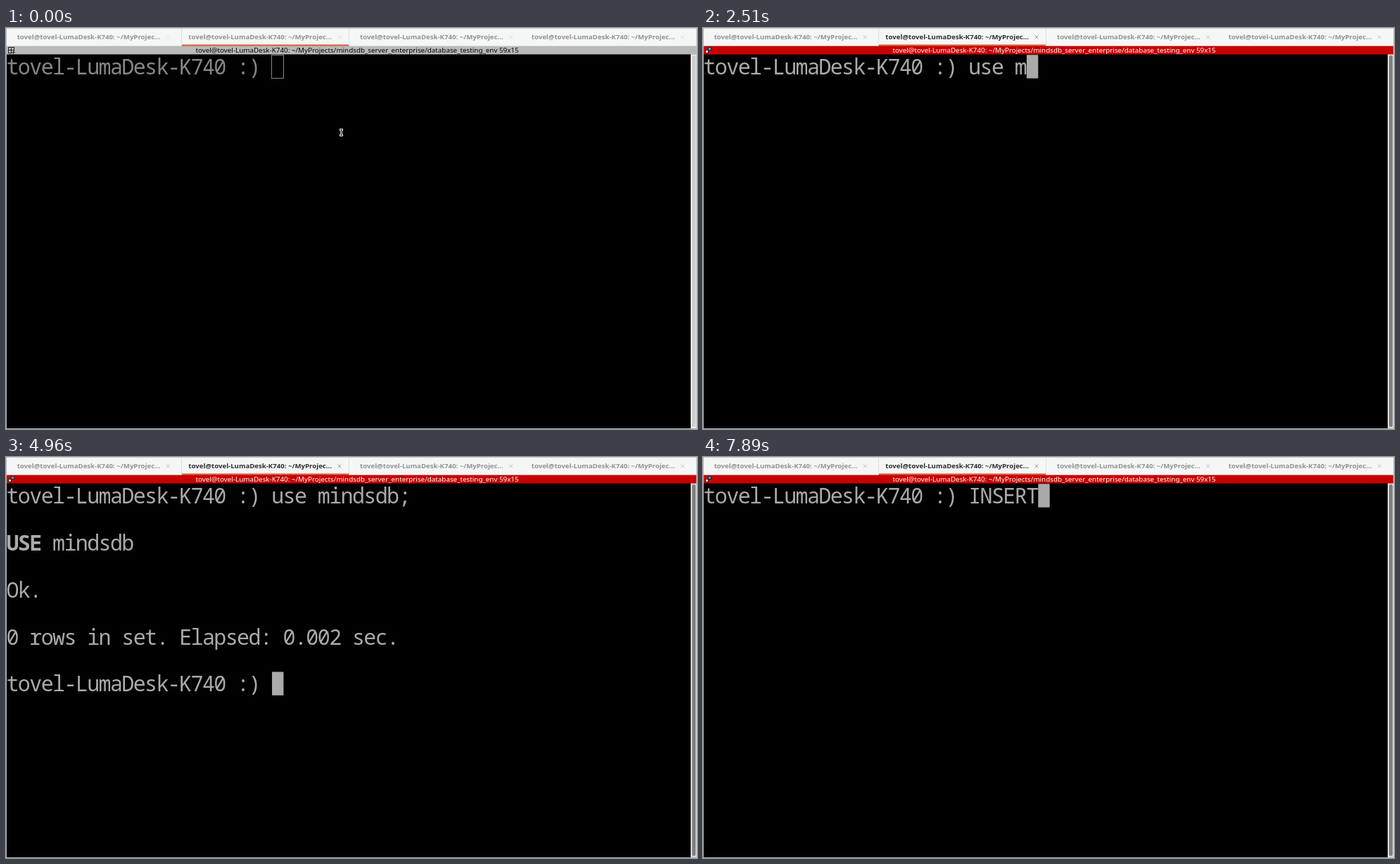
An HTML page with a canvas that plays this animation: 982x570 px, repeating every 8000 ms.

```html
<!DOCTYPE html>
<html lang="en">
<head>
<meta charset="utf-8">
<title>Terminal session</title>
<style>
  html, body { margin: 0; width: 100%; height: 100%; overflow: hidden; background: #000; }
  canvas { display: block; width: 982px; height: 570px; }
</style>
</head>
<body>
<canvas id="stage" width="982" height="570"></canvas>
<script>
const ctx = document.getElementById('stage').getContext('2d');
const LOOP = 8000;
const HOST = 'tovel-LumaDesk-K740';
const USER = 'tovel@' + HOST + ': ~/MyProjec';
const PROMPT = HOST + ' :) ';
const TITLE = USER + 'ts/mindsdb_server_enterprise/database_testing_env 59x15';
const UI = '"Noto Sans", "Open Sans", sans-serif';
const MONO = '"Noto Sans Mono", "DejaVu Sans Mono", monospace';
const CELL_W = 16.38, CELL_H = 33.4, LEFT = 1.3, TOP = 38.2;
const BAR_TOP = 25.6, BAR_BOTTOM = 37.6;

const FIRST = { text: 'use mindsdb;', times: [2010, 2090, 2290, 2400, 2510, 2680, 2910, 3010, 3170, 3300, 3590, 3850] };
const SECOND = { text: 'INSERT', times: [6940, 7120, 7210, 7310, 7520, 7890] };
const ENTER = 4260, CLEAR = 5330;
const CURSOR_OFF = [[1300, 1800], [4740, 4960], [5940, 6550]];
// Pointer stops as [start, x, y]; typing hides it.
const POINTER = [[0, 476, 148], [410, 476, 147], [570, 475, 146], [700, 475, 145], [800, 572, 42], [1300, 479, 145]];
const POINTER_HIDDEN = 2010;

const typed = (entry, t) => entry.text.slice(0, entry.times.filter(k => k <= t).length);

function rect(color, x, y, w, h) {
  ctx.fillStyle = color;
  ctx.fillRect(x, y, w, h);
}

function gray(from, to, k) {
  const v = Math.round(from + (to - from) * k);
  return `rgb(${v},${v},${v})`;
}

function label(text, x, y, font, color) {
  ctx.font = font;
  ctx.fillStyle = color;
  ctx.textAlign = 'center';
  ctx.fillText(text, x, y);
}

function drawClose(x, y, color) {
  ctx.strokeStyle = color;
  ctx.lineWidth = 1;
  ctx.beginPath();
  ctx.moveTo(x - 2.5, y - 2.5);
  ctx.lineTo(x + 2.5, y + 2.5);
  ctx.moveTo(x + 2.5, y - 2.5);
  ctx.lineTo(x - 2.5, y + 2.5);
  ctx.stroke();
}

function drawTabs(focus) {
  rect('#f5f6f6', 0, 0, 982, 26);
  rect('#c4c4c4', 0, 0, 982, 1);
  rect('#dededd', 249, 1, 1, 25);
  rect('#dededd', 487, 1, 1, 25);
  rect('#d9613b', 250, 23.5, 237, 2.5);
  for (let i = 0; i < 4; i++) {
    const active = i === 1;
    const x = 117.5 + i * 243.7;
    label(USER + '…', x, 16.2, 'bold 9.65px ' + UI, gray(146, active ? 46 : 146, focus));
    drawClose(x + 112.8, 13, gray(226, active ? 160 : 198, focus));
  }
}

function drawPaneIcon(focused) {
  if (focused) {
    rect('#1c2b36', 7, 27, 5, 5);
    rect('#4a9ac4', 8, 28, 3, 3);
    rect('#2b1a1a', 3, 31, 5, 5);
    rect('#e4e4e4', 4, 32, 3, 3);
    return;
  }
  ctx.strokeStyle = '#222';
  ctx.lineWidth = 1;
  ctx.strokeRect(3.5, 27.5, 8, 8);
  rect('#222', 7, 28, 1, 7);
  rect('#222', 4, 31, 8, 1);
  rect('#b9b9b9', 9, 33, 4, 4);
  rect('#222', 10, 33, 1, 4);
  rect('#222', 9, 34, 4, 1);
}

function drawTitle(focused) {
  rect(focused ? '#c80000' : '#b9b9b9', 0, BAR_TOP, 982, BAR_BOTTOM - BAR_TOP);
  drawPaneIcon(focused);
  label(TITLE, 499, 35.3, '9.82px ' + UI, focused ? '#fff' : '#000');
}

function drawLine(text, row, color, boldCount = 0) {
  const y = Math.round(TOP + row * CELL_H) + 28;
  [...text].forEach((ch, i) => {
    const weight = i < boldCount ? 'bold ' : '';
    label(ch, LEFT + (i + 0.5) * CELL_W, y, weight + '30px ' + MONO, color);
  });
}

function drawCursor(col, row, focused) {
  const x = LEFT + col * CELL_W;
  const y = TOP + row * CELL_H;
  if (focused) {
    rect('#aaa', x, y, CELL_W, CELL_H);
  } else {
    ctx.strokeStyle = '#868686';
    ctx.lineWidth = 1;
    ctx.strokeRect(Math.round(x) - 0.5, Math.round(y) + 0.5, 17, 33);
  }
}

function drawTerminal(t, focused) {
  const color = focused ? '#aaa' : '#868686';
  const command = t < CLEAR ? typed(FIRST, t) : typed(SECOND, t);
  const answered = t >= ENTER && t < CLEAR;
  const row = answered ? 8 : 0;
  const col = PROMPT.length + (answered ? 0 : command.length);
  rect('#000', 0, BAR_BOTTOM, 973, 570 - BAR_BOTTOM);
  drawLine(PROMPT + command, 0, color);
  if (answered) {
    drawLine('USE mindsdb', 2, color, 3);
    drawLine('Ok.', 4, color);
    drawLine('0 rows in set. Elapsed: 0.002 sec.', 6, color);
    drawLine(PROMPT, 8, color);
  }
  if (!CURSOR_OFF.some(([a, b]) => t >= a && t < b)) drawCursor(col, row, focused);
}

function drawFrame(focused) {
  rect(focused ? '#d8d8d8' : '#e9e9e9', 973, BAR_BOTTOM, 9, 570 - BAR_BOTTOM);
  ctx.fillStyle = focused ? '#808080' : '#cfcfcf';
  ctx.beginPath();
  ctx.roundRect(975, 39, 5, 528, 2.5);
  ctx.fill();
  rect('#b4b4b4', 0, 0, 1, 570);
  rect('#b4b4b4', 0, 569, 982, 1);
  rect('#c4c4c4', 981, 0, 1, 570);
}

function drawPointer(t) {
  if (t >= POINTER_HIDDEN) return;
  const [, x, y] = POINTER.filter(p => p[0] <= t).pop();
  rect('#e6e6e6', x - 2, y - 5, 5, 3);
  rect('#e6e6e6', x - 2, y + 3, 5, 3);
  rect('#e6e6e6', x - 1, y - 4, 3, 9);
  rect('#111', x, y - 4, 1, 9);
  rect('#111', x - 1, y - 4, 3, 1);
  rect('#111', x - 1, y + 4, 3, 1);
}

function render(t) {
  const focused = t >= 570;
  drawTabs(t < 570 ? 0 : t < 700 ? 0.5 : 1);
  drawTitle(focused);
  drawTerminal(t, focused);
  drawFrame(focused);
  drawPointer(t);
}

const start = performance.now();
function tick() {
  render((performance.now() - start) % LOOP);
  requestAnimationFrame(tick);
}
tick();
</script>
</body>
</html>
```
